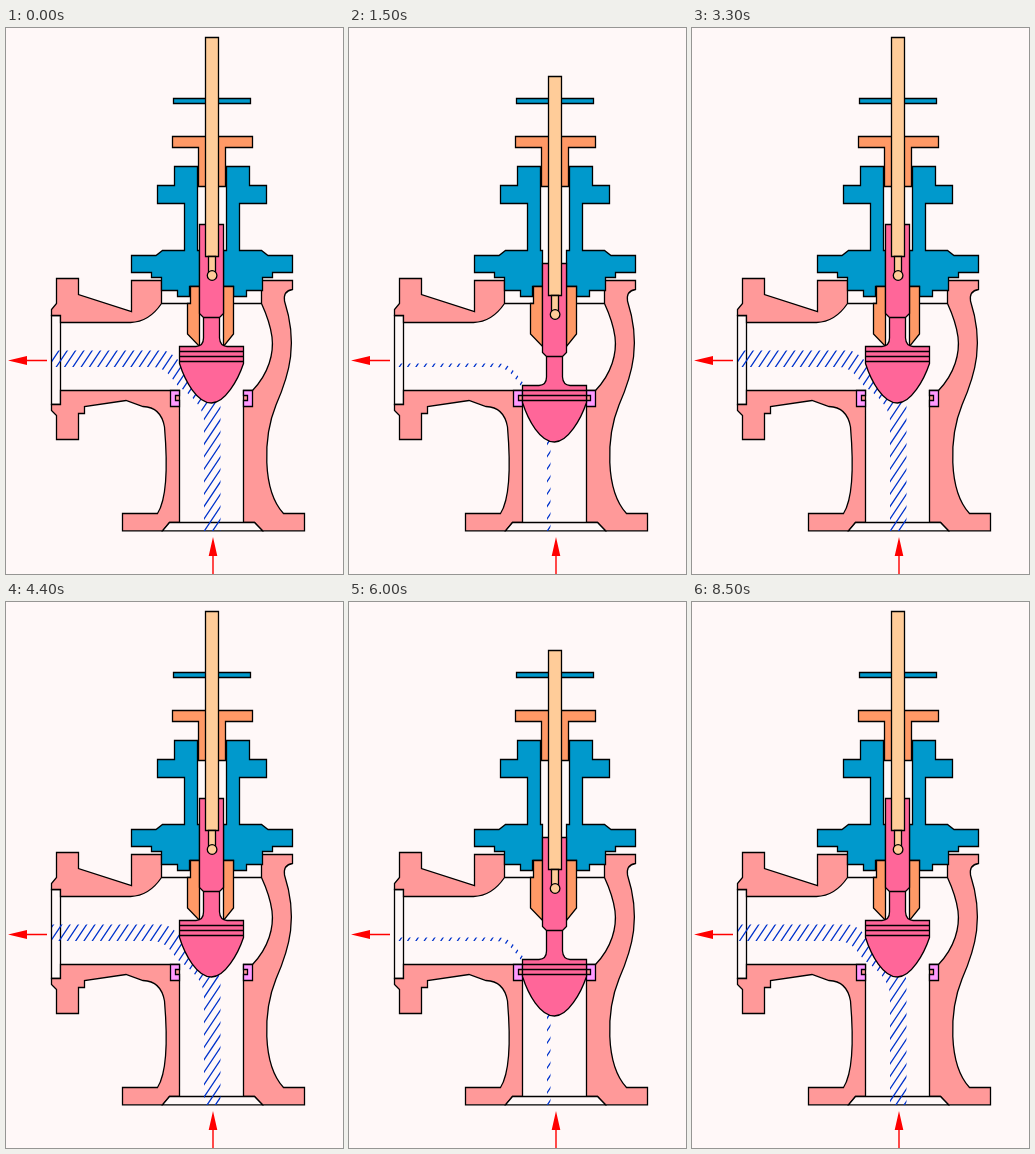
An HTML page with a canvas that plays this animation: 337 by 546 pixels, repeating every 8.6 s.

```html
<!DOCTYPE html>
<html lang="en">
<head>
<meta charset="utf-8">
<title>Angle valve</title>
<style>
html, body { margin: 0; width: 100%; height: 100%; overflow: hidden; background: #fff8f8; }
canvas { display: block; }
</style>
</head>
<body>
<canvas id="stage" width="337" height="546"></canvas>
<script>
const ctx = document.getElementById('stage').getContext('2d');
const LOOP = 8600, STEP = 100, DROP = 39;
const PAPER = '#fff8f8', SALMON = '#ff9999', BLUE = '#0099cc', ORANGE = '#ff9966',
      PEACH = '#ffcc99', PINK = '#ff6699', LILAC = '#ff99ff';

// Plug travel over time: [ms, share of the full drop]
const TRAVEL = [[0, 0], [600, 0], [1500, 1], [2300, 1], [3200, .14], [3300, 0],
                [4990, 0], [5975, 1], [6715, 1], [7845, 0], [LOOP, 0]];

function travel(t) {
  const i = TRAVEL.findIndex(k => k[0] > t);
  const [t0, a] = TRAVEL[i - 1], [t1, b] = TRAVEL[i];
  return a + (b - a) * (t - t0) / (t1 - t0);
}

function shape(d, fill) {
  const p = new Path2D(d);
  if (fill) { ctx.fillStyle = fill; ctx.fill(p); }
  ctx.stroke(p);
}

function pen(color, width) {
  ctx.strokeStyle = color;
  ctx.lineWidth = width;
}

function drawBody() {
  shape('M155.5 275.5H255.5');
  shape('M45.5 287.5H54.5V376.5H45.5Z');
  shape('M54.5 294.5H124.5Q143 294 155.5 275.5V252.5H125.5V283.5L72.5 266.5V250.5H50.5V275.5L45.5 281.5V287.5H54.5Z', SALMON);
  shape('M54.5 362.5H173.5V494.5H163.5L156.5 502.8H116.5V485.5H151.5C164 466 160 417 158.5 399Q155 379 137 378.5L120 372.5L78.5 378.5V385.5H72.5V411.5H50.5V387.5L45.5 382.5V376.5H54.5Z', SALMON);
  shape('M255.5 252.5H286.5V261.5Q277 263 278.5 273C292 315 284 345 270 377C257 409 256 462 277.5 485.5H298.5V502.8H256.5L248.5 494.5H237.5V362.5H246.5C263 345 268 325 266 309Q264 294 255.5 275.5Z', SALMON);
  shape('M163.5 494.5H248.5L256.5 502.8H156.5Z', PAPER);
  shape('M164.5 362.5H173.5V367.5H169.5V372.5H173.5V378.5H164.5Z', LILAC);
  shape('M246.5 362.5H237.5V367.5H241.5V372.5H237.5V378.5H246.5Z', LILAC);
}

function drawBonnet() {
  ctx.fillStyle = PAPER;
  ctx.fillRect(191, 138, 29, 121);
  shape('M168.5 138.5H191.5V222.5H193.5V258.5H183.5V268.5H171.5V262.5H155.5V249.5H145.5V244.5H125.5V227.5H150L156.5 222.5H178.5V175.5H151.5V157.5H168.5Z', BLUE);
  shape('M243.5 138.5H220.5V222.5H217.5V258.5H227.5V268.5H240.5V262.5H256.5V249.5H266.5V244.5H286.5V227.5H262L255.5 222.5H233.5V175.5H260.5V157.5H243.5Z', BLUE);
  shape('M166.5 108.5H246.5V119.5H219.5V158.5H192.5V119.5H166.5Z', ORANGE);
  shape('M184.5 258.5H193.5V318.5L181.5 306V275.5H184.5Z', ORANGE);
  shape('M227.5 258.5H217.5V318.5L227.5 306Z', ORANGE);
  shape('M167.5 70.5H244.5V75.5H167.5Z', BLUE);
}

function drawFlow(lift, phase) {
  const w = 3.5 + 13 * lift, y = 339 - w, n = w * .8;
  ctx.save();
  ctx.clip(new Path2D(
    `M46 339H148C160 340 165 349 172 358Q196 374 198 392V503H${198 + w}V${392 - n}` +
    `Q${196 + w} ${374 - n} ${172 + w * .7} ${358 - n}C${165 + w * .6} ${349 - n} ${160 + w * .4} ${y} ${149 + w * .4} ${y}H46Z`));
  pen('#0033cc', 1.3);
  ctx.beginPath();
  const slope = 1.5, gap = 8.3;
  for (let k = -phase - 28; k < 14; k++) {
    const c = 475.5 + k * gap;
    ctx.moveTo(c - 310 / slope, 310);
    ctx.lineTo(c - 510 / slope, 510);
  }
  ctx.stroke();
  ctx.restore();
}

function drawPlug(y) {
  ctx.save();
  ctx.translate(0, y);
  pen('#000', 1.3);
  shape('M193.5 196.5H217.5V285.5L213.5 289.5V310Q214 318 221 318.5H237.5V335.5C232 352 219 375 205.5 375C191 375 179 353 173.5 335.5V318.5H190Q197.5 318 197.5 310V289.5L193.5 285.5Z', PINK);
  shape('M197.5 289.5H213.5M173.5 323.5H237.5M173.5 328.5H237.5M173.5 333.5H237.5');
  shape('M199.5 9.5H212.5V228.5H199.5Z', PEACH);
  shape('M202.5 228.5H209.5V244.5H202.5Z', PEACH);
  shape('M201.3 247.5a4.8 4.8 0 1 0 9.6 0a4.8 4.8 0 1 0 -9.6 0Z', PEACH);
  ctx.restore();
}

function drawArrows() {
  pen('#f00', 1.4);
  shape('M41 332.5H20M207 546V526');
  ctx.fillStyle = '#f00';
  ctx.fill(new Path2D('M2 332.5L21 328V337ZM207 509L202.7 528H211.3Z'));
}

function draw(t) {
  const step = Math.floor(t / STEP), drop = travel(step * STEP);
  const phase = drop === 1 ? 0 : step % 3 / 3;
  ctx.fillStyle = PAPER;
  ctx.fillRect(0, 0, 337, 546);
  pen('#000', 1.3);
  drawBody();
  drawFlow(1 - drop, phase);
  pen('#000', 1.3);
  drawBonnet();
  drawPlug(Math.round(drop * DROP));
  drawArrows();
}

const start = performance.now();
function tick() {
  draw((performance.now() - start) % LOOP);
  requestAnimationFrame(tick);
}
tick();
</script>
</body>
</html>
```
